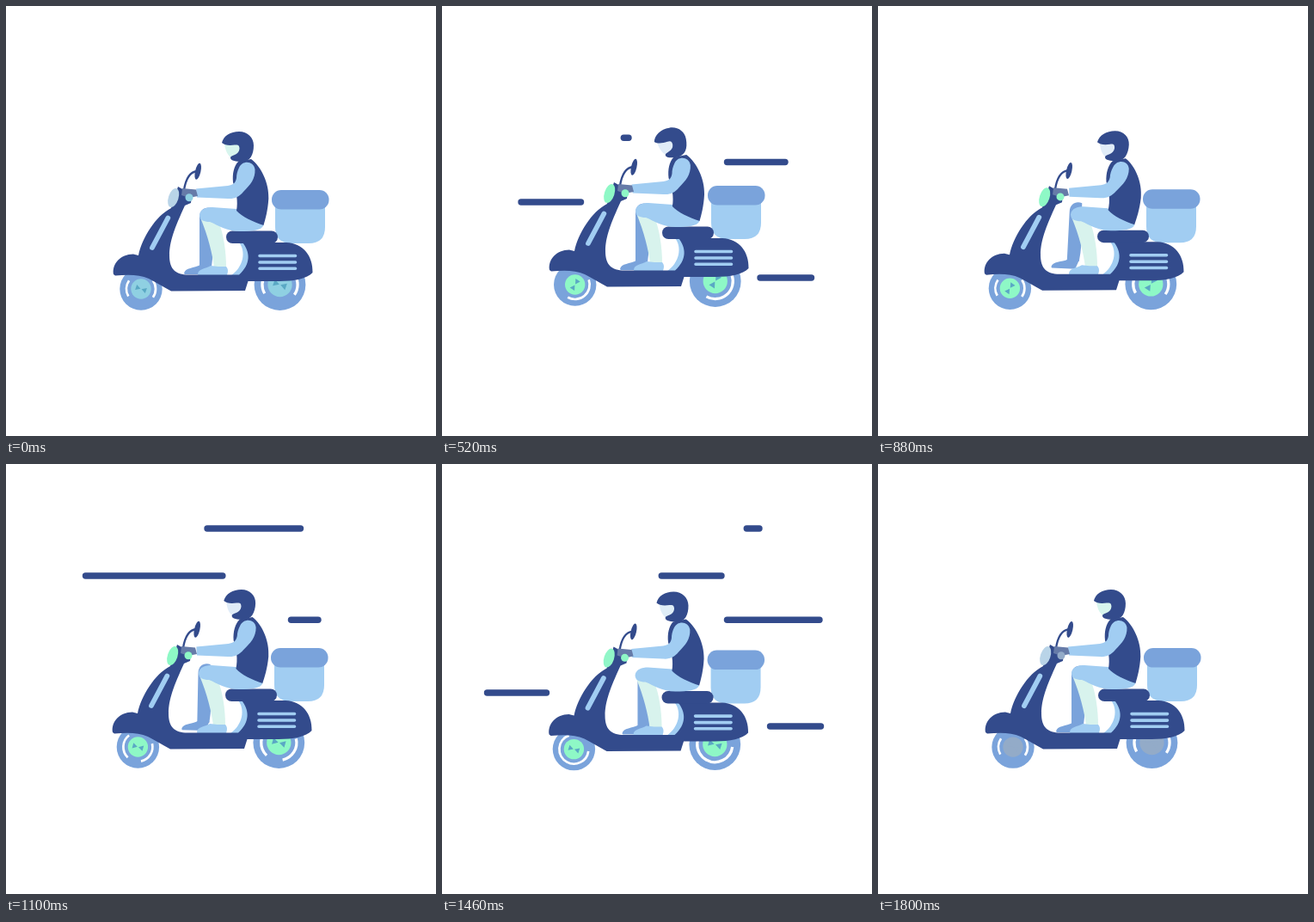
Animation, 500 px wide and 500 px high, one loop 1.82 s. Source, as an HTML page:

```html
<!DOCTYPE html>
<html lang="en">
<head>
<meta charset="utf-8">
<title>Scooter delivery</title>
<style>
  html, body { margin: 0; width: 100%; height: 100%; overflow: hidden; background: #fff; }
  svg { display: block; width: 100vw; height: 100vh; }
  .navy { fill: #334b8c; }
  .mid { fill: #7aa3db; }
  .light { fill: #a1cdf2; }
  .mint { fill: #d8f3ed; }
  .trim { fill: none; stroke: #a1cdf2; stroke-linecap: round; }
  .arc { fill: none; stroke: #fff; stroke-width: 2.7; }
  #lines line { stroke: #334b8c; stroke-width: 7.4; stroke-linecap: round; }
</style>
</head>
<body>
<svg viewBox="0 0 500 500">
  <g id="lines"></g>
  <g id="wheels"></g>
  <g id="body">
    <!-- cargo box -->
    <path class="light" d="M313 230H371V257Q371 276 352 276H332Q313 276 313 257Z"/>
    <rect class="mid" x="309" y="214" width="66.5" height="22.5" rx="11"/>

    <!-- far leg -->
    <g id="farLeg">
      <path class="mid" d="M225 246C225 236 232 233 239 235L240 262C241 276 241 290 239 303H225Z"/>
      <path class="mid" d="M207 311C208 304 219 305 226 301H239C238 305 236 309 235 312H208Z"/>
    </g>

    <!-- near shin and shoe -->
    <path class="mint" d="M226 246L247 251C253 264 256 286 256 304H242C240 288 235 268 226 246Z"/>
    <path class="light" d="M223 312.5C223 305 232 306 238 302C244 303 250 303 256 303C259 306 258 310 257 313H224Z"/>

    <!-- scooter frame -->
    <path class="light" d="M271 275C279 285 277 303 261 314H280L285 276Z"/>
    <path class="navy" d="M125 312C123 300 133 288.5 148 288.5L154 290C158 270 174 244 192 235L200 210L216 219L215 229L208 232C196 258 190 274 190 290C190 306 197 312.5 212 312.5H271C285 300 284 286 275 275H326C346 276 357 291 356.5 310C350 317 335 320 318 320H281.500L278 331L192 331.5C182 326 174 321 166 317C155 312 142 312 127 313.5Z"/>
    <rect class="navy" x="256" y="261.5" width="60" height="14.5" rx="7.2"/>
    <path class="trim" stroke-width="5.8" d="M188.3 246.5L170 281"/>
    <path class="trim" stroke-width="3.6" d="M295 290.5H336.5M295 298H336.5M295 305.2H336.5"/>

    <!-- near thigh -->
    <path class="light" d="M225 243C226 236 233 234 240 234L268 236C278 244 292 249 299.5 255C297 261 286 262 272 262C256 262 247 255 237 251C230 251 225 249 225 243Z"/>

    <!-- rider -->
    <g id="torso">
      <path class="navy" d="M270 181L285 178C297 187 306 206 305.300 224C304.5 238 301.5 248 299.5 255C288 251 274 245 268 238C270 228 268 215 264 205C263 195 265 186 270 181Z"/>
      <path class="light" d="M271 188C275 179 288 180 289.5 190C290 201 284 208 276 216C271 222 266 224.5 258 224L222 222.5L221 212.5L258 209C264 208 267 206 268 200C268 196 269 192 271 188Z"/>
      <g id="head">
        <path id="face" d="M254 160H273V172L264 178C258 175 255 168 254 160Z"/>
        <path class="navy" d="M251 159C253 151 261 146 271 146C281 146 288 153 288 162C288 173 284 181 274 181C268 181 261 180 261 176.5C261 173 271 174 271.5 166C271.5 162 270 161 266 161.5C260 162.5 254 162 251 159Z"/>
      </g>
    </g>

    <!-- handlebar -->
    <path d="M207 214C209 201 214 193 222 192" fill="none" stroke="#334b8c" stroke-width="2.3"/>
    <ellipse class="navy" cx="223.2" cy="192.3" rx="3.2" ry="9.7" transform="rotate(13 223.2 192.3)"/>
    <path d="M205 212L221 213.5L223 221L213 223L204 220Z" fill="#667ba8"/>
    <ellipse id="lamp" cx="194.7" cy="223" rx="5.8" ry="11.4" transform="rotate(18 194.7 223)"/>
    <circle id="button" cx="213" cy="222.7" r="4.5"/>
  </g>
</svg>
<script>
  const LOOP = 1820;
  const TRAVEL = 190; // time a speed line takes to grow or to shrink
  const $ = id => document.getElementById(id);

  // Each gust sends out its lines one after another; leave is when a line starts to shrink.
  const gusts = [
    { start: 20, lines: [
      { x: 209.5, y: 94, length: 99, leave: 290 },
      { x: 126.5, y: 153.3, length: 90.5, leave: 360 },
      { x: 331.5, y: 181.5, length: 67.5, leave: 550 },
      { x: 92, y: 228, length: 69.5, leave: 560 },
      { x: 370, y: 316, length: 59.5, leave: 580 }
    ] },
    { start: 965, lines: [
      { x: 234, y: 75, length: 135, leave: 1310 },
      { x: 92.5, y: 130, length: 232.5, leave: 1340 },
      { x: 331.5, y: 181.2, length: 107.5, leave: 1485 },
      { x: 52.5, y: 266, length: 69, leave: 1610 },
      { x: 381.5, y: 305, length: 59, leave: 1610 }
    ] }
  ];

  const wheels = [
    { x: 157, y: 329, scale: 1, slide: -3.6, bounce: 1 },
    { x: 318.5, y: 324, scale: 1.21, slide: -1.2, bounce: 0.8 }
  ];

  function set(el, attrs) {
    for (const key in attrs) el.setAttribute(key, attrs[key]);
  }

  function make(parent, tag, attrs = {}) {
    const el = document.createElementNS('http://www.w3.org/2000/svg', tag);
    set(el, attrs);
    return parent.appendChild(el);
  }

  function ease(t, from, to) {
    const p = Math.max(0, Math.min(1, (t - from) / (to - from)));
    return p * p * (3 - 2 * p);
  }

  // Rises from 0 to 1, stays there, and falls back.
  const hold = (t, from, full, fade, to) => ease(t, from, full) - ease(t, fade, to);
  const pulse = (t, from, peak, to) => hold(t, from, peak, peak, to);

  function mix(a, b, p) {
    return a.map((v, i) => Math.round(v + (b[i] - v) * p));
  }
  const hex = s => [1, 3, 5].map(i => parseInt(s.slice(i, i + 2), 16));
  const css = c => `rgb(${c})`;

  const cyan = hex('#8fd0e2');
  const green = hex('#8ef8c6');
  const grey = hex('#93abc8');
  const glass = hex('#b9d4e8');
  const teal = hex('#5aa8c4');
  const mint = hex('#d8f5ee');
  const ice = hex('#e0ecf8');

  function arc(r, from, to) {
    if (to - from < 1) return '';
    const point = deg => {
      const a = deg * Math.PI / 180;
      return `${r * Math.cos(a)} ${r * Math.sin(a)}`;
    };
    return `M${point(from)}A${r} ${r} 0 ${to - from > 180 ? 1 : 0} 1 ${point(to)}`;
  }

  for (const w of wheels) {
    w.el = make($('wheels'), 'g');
    make(w.el, 'circle', { r: 24.7, class: 'mid' });
    w.arcs = make(w.el, 'path', { class: 'arc' });
    w.disc = make(w.el, 'circle', { r: 11.7 });
    w.blades = make(w.el, 'path', { d: 'M.6 0L6.2 -3.2V3.2ZM-.6 0L-6.2 -3.2V3.2Z' });
  }

  for (const gust of gusts) {
    gust.lines.forEach((line, i) => {
      line.enter = gust.start + 17 * i * i;
      line.el = make($('lines'), 'line', { y1: line.y, y2: line.y });
    });
  }

  function drawBody(t, x, y) {
    const lean = -pulse(t, 0, 480, 720) + 4.8 * pulse(t, 600, 900, 1400) - 2.5 * pulse(t, 1350, 1600, LOOP);
    const skew = lean / 87;
    const lift = pulse(t, 600, 900, 1250);
    const step = 3 * pulse(t, 1100, 1500, LOOP);

    set($('body'), { transform: `translate(${x} ${y})` });
    set($('torso'), { transform: `matrix(1 0 ${-skew} 1 ${250 * skew} 0)` });
    set($('head'), { transform: `rotate(${-10 * pulse(t, 0, 500, 760)} 272 180)` });
    set($('farLeg'), { transform: `translate(${step - lift} ${-5.5 * lift}) rotate(${3 * lift} 232 240)` });

    set($('lamp'), { fill: css(mix(glass, green, hold(t, 0, 480, 1400, 1800))) });
    set($('face'), { fill: css(mix(mint, ice, hold(t, 0, 280, 1400, 1650))) });
  }

  function drawWheels(t, y) {
    const drift = hold(t, 0, 880, 1600, 1800);
    const spin = 20 - 900 * t / LOOP;
    const fade = ease(t, 1600, 1800);
    const hub = css(mix(mix(cyan, green, ease(t, 0, 280)), grey, fade));

    // Two side arcs tilt, gather below the hub, then close into a wide ring.
    const tilt = 22 * pulse(t, 0, 280, 520);
    const sag = pulse(t, 280, 520, 880);
    const join = hold(t, 900, 1300, 1600, 1800);
    const rings =
      arc(17, 150 + tilt - 32 * join, 215 + tilt - 65 * sag + 35 * join) +
      arc(17, -35 + tilt + 15 * sag + 43 * join, 35 + tilt + 85 * (sag + join));

    set($('button'), { fill: hub });
    for (const w of wheels) {
      const place = `${w.x + w.slide * drift} ${w.y + w.bounce * y}`;
      set(w.el, { transform: `translate(${place}) scale(${w.scale})` });
      set(w.arcs, { d: rings });
      set(w.disc, { fill: hub });
      set(w.blades, { fill: css(mix(teal, grey, fade)), transform: `rotate(${spin})` });
    }
  }

  function drawLine(t, { el, x, length, enter, leave }) {
    const head = ease(t, enter, enter + TRAVEL);
    const tail = ease(t, leave, leave + TRAVEL);
    set(el, {
      x1: x + length * tail,
      x2: x + length * head,
      visibility: head > 0 && tail < 1 ? 'visible' : 'hidden'
    });
  }

  function draw(t) {
    const x = -hold(t, 520, 880, 1300, 1600);
    const y = 4.7 * pulse(t, 1300, 1600, LOOP) - 5 * pulse(t, 0, 520, 1000);
    drawBody(t, x, y);
    drawWheels(t, y);
    for (const gust of gusts) gust.lines.forEach(line => drawLine(t, line));
  }

  const start = performance.now();
  function tick() {
    draw((performance.now() - start) % LOOP);
    requestAnimationFrame(tick);
  }
  tick();
</script>
</body>
</html>
```
